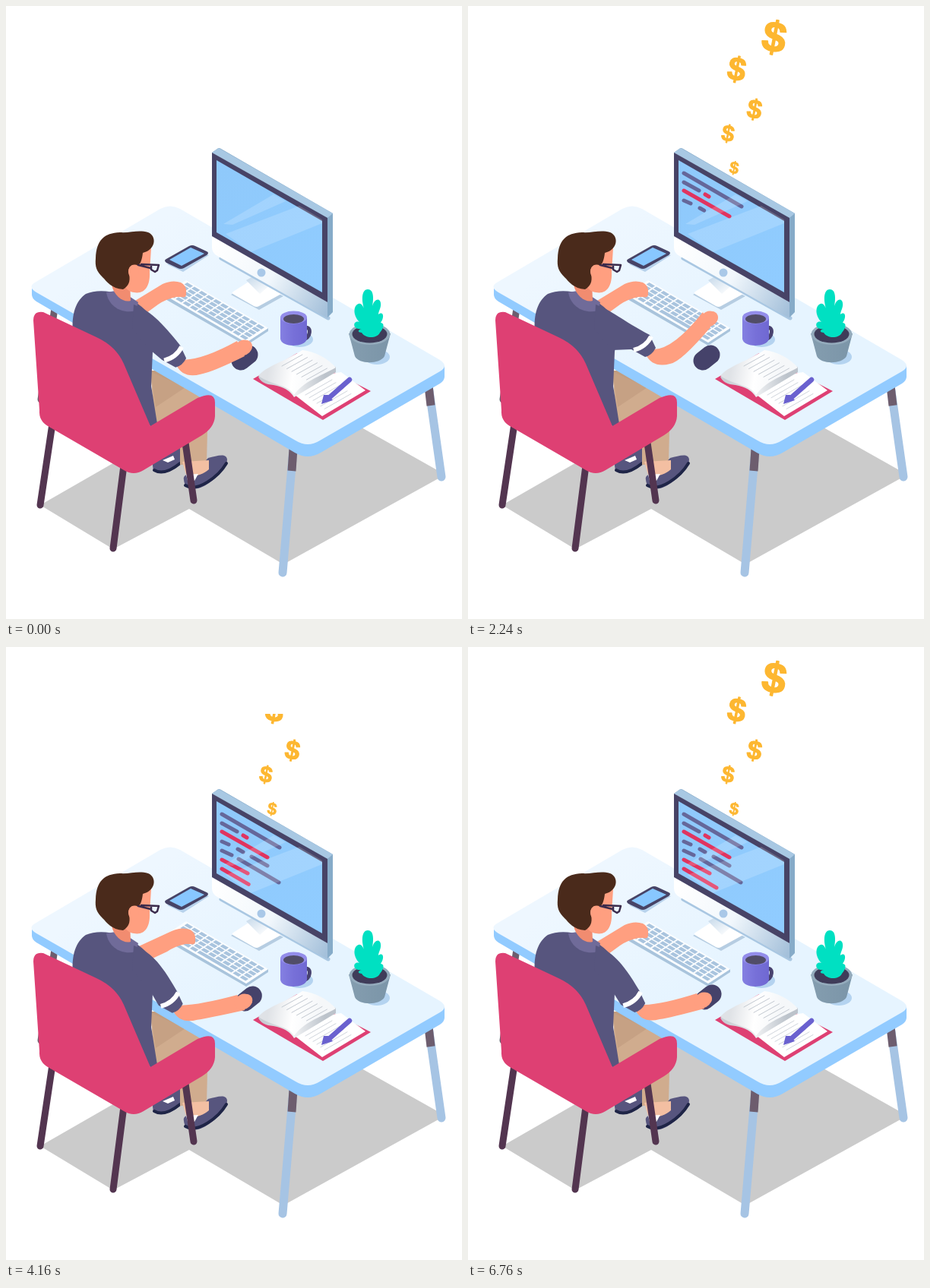
An HTML page with a canvas that plays this animation: 600x807 px, repeating every 6.8 s.

```html
<!DOCTYPE html>
<html lang="en">
<head>
<meta charset="utf-8">
<title>Working at the desk</title>
<style>
html, body { margin: 0; width: 100%; height: 100%; overflow: hidden; background: #fff; }
canvas { display: block; width: 600px; height: 807px; }
</style>
</head>
<body>
<canvas id="stage" width="600" height="807"></canvas>
<script>
const ctx = document.getElementById('stage').getContext('2d');
const SKIN = '#ff9f80', SHIRT = '#57557e', DARK = '#45426a', PINK = '#de4073', STEEL = '#a6c4e4';

const clamp = (v, a = 0, b = 1) => Math.min(b, Math.max(a, v));
const mix = (a, b, k) => a + (b - a) * k;
const ramp = (v, a, b) => { const k = clamp((v - a) / (b - a)); return k * k * (3 - 2 * k); };

function shape(d, fill) {
  ctx.fillStyle = fill;
  ctx.fill(new Path2D(d));
}
function line(d, width, color, cap = 'round') {
  ctx.strokeStyle = color;
  ctx.lineWidth = width;
  ctx.lineCap = cap;
  ctx.lineJoin = 'round';
  ctx.stroke(new Path2D(d));
}
function oval(x, y, rx, ry, fill, turn = 0) {
  ctx.fillStyle = fill;
  ctx.beginPath();
  ctx.ellipse(x, y, rx, ry, turn, 0, Math.PI * 2);
  ctx.fill();
}
function fade(x0, y0, x1, y1, ...colors) {
  const g = ctx.createLinearGradient(x0, y0, x1, y1);
  colors.forEach((c, i) => g.addColorStop(i / (colors.length - 1), c));
  return g;
}

function drawFloor() {
  shape('M45 657L280 522L420 528L578 617L365 735L241 662L141 715Z', '#cbcbcb');
  line('M64 398L46 518', 9, '#6d5d6e');
}

function drawLegs() {
  shape('M190 480L240 480L232 584L222 586L196 545Z', '#c19d80');
  shape('M193 605C192 597 202 592 212 588L222 580H234V598C224 612 206 618 194 612Z', SHIRT);
  line('M195 611Q208 619 229 602', 4, '#1f2547');
  shape('M206 598L220 592L222 597L213 601Z', '#fff');
  shape('M190 482L266 516L264 602L229 604L229 548L205 552L196 545Z', '#d0ac8e');
  shape('M190 482L236 502L197 528Z', '#c6a184');
  shape('M234 624C232 617 240 616 250 612L266 595C278 592 290 588 291 597C291 608 272 628 256 634C245 638 235 635 234 624Z', SHIRT);
  line('M236 631C252 641 280 619 290 602', 4, '#1f2547');
  shape('M232 600L267 598L267 610C258 618 244 621 237 617Z', '#f3bfa2');
  shape('M237 617L253 616L248 625L239 625Z', '#fff');
}

function drawTable() {
  for (const [a, b, c] of [['378 583', '376 612', '364 746'], ['556 500', '559 526', '573 620']]) {
    line(`M${a}L${c}`, 11, STEEL);
    line(`M${a}L${b}`, 11, '#6d5d6e', 'butt');
  }
  shape('M34 370V380Q34 385 40 389L380 588Q397 598 414 588L571 497Q577 493 577 488V474Z', '#92cbff');
  shape('M38 364L203 267Q216 260 229 267L571 466Q583 474 571 481L413 572Q397 582 381 572L40 377Q28 370 38 364Z',
    fade(190, 290, 300, 450, '#eef7ff', '#e6f4ff'));
}

function drawMonitor() {
  shape('M296 380L326 364L365 382L333 400Z', '#b6cde2');
  shape('M299 376L327 358L364 378L333 395Q330 397 326 395L300 380Q296 378 299 376Z', '#fff');
  shape('M316 361L338 349L355 361L334 379Z', fade(325, 350, 345, 378, '#c6d9ea', '#fff'));
  line('M283 332L424 411', 5, '#a9c7e2');
  shape('M271 303L423 390V411L278 329Q271 325 271 318Z', fade(275, 315, 423, 400, '#fff', '#f1f7fc', '#a4c0da'));
  shape('M271 193L278 188Q280 186 283 188L430 273V403L423 410V280Z', '#86abc9');
  shape('M271 193L280 187L430 273L423 279Z', '#a8c8e3');
  shape('M271 193L423 279V390L271 303Z', '#474366');
  shape('M277 203L416 283V377L277 298Z', fade(280, 210, 410, 370, '#8fc9fb', '#90ccff'));
  oval(336, 351, 5.5, 5.5, '#a9c8e8');
}

// x0, y0, x1, y1, color, first and last frame of the typing
const GREY = '#65679a', RED = '#e0345f';
const CODE = [
  [284, 220, 360, 264, GREY, 15, 25],
  [284, 232, 304, 243, GREY, 25, 29], [312, 248, 317, 251, RED, 29, 32],
  [284, 243, 344, 277, RED, 34, 46],
  [284, 256, 293, 260, GREY, 47, 50], [305, 266, 312, 270, GREY, 52, 57], [323, 276, 344, 288, GREY, 58, 63],
  [284, 268, 297, 274, GREY, 64, 68], [306, 279, 359, 310, GREY, 68, 78],
  [284, 280, 318, 298, RED, 84, 94],
  [284, 292, 327, 317, RED, 95, 106]
];
function drawScreen(frame) {
  for (const [x0, y0, x1, y1, color, from, to] of CODE) {
    if (frame <= from) continue;
    const k = clamp((frame - from) / (to - from));
    line(`M${x0} ${y0}L${mix(x0, x1, k)} ${mix(y0, y1, k)}`, 5, color);
  }
  const glare = 'rgba(255,255,255,.17)';
  shape('M286 287L352 248L368 257L298 288Z', glare);
  shape('M289 300L386 263L416 281V286L322 324Z', glare);
}

function drawPhone() {
  shape('M212 340L248 321L267 328L233 350Z', '#b7d2ec');
  shape('M211 333L241 316Q245 314 249 316L264 323Q268 325 264 328L234 345Q230 347 226 345L211 338Q207 335 211 333Z', '#474366');
  shape('M215 334L243 318L261 326L231 342Z', '#88c7ff');
}

function drawKeyboard() {
  const at = (u, v) => `${237 + 108 * u - 29 * v} ${361 + 63 * u + 19 * v}`;
  shape('M208 380L316 443L345 424V428L316 447L208 385Z', '#a9c4dc');
  shape(`M${at(0, 0)}L${at(1, 0)}L${at(1, 1)}L${at(0, 1)}Z`, '#fbfdff');
  for (let row = 0; row < 5; row++) {
    const v = .06 + row * .18;
    for (let col = 0; col < 11; col++) {
      const wide = row === 4 && col > 3 && col < 8;
      const u = .03 + col * .087, end = u + (wide ? .09 : .07);
      shape(`M${at(u, v)}L${at(end, v)}L${at(end, v + .135)}L${at(u, v + .135)}Z`, '#a9c4de');
    }
  }
}

function drawCup() {
  oval(386, 439, 18, 10, '#b4d3f0');
  line('M392 424C403 419 401 439 391 438', 5, '#48426f');
  shape('M361 410V438C362 450 394 450 396 438V410Z', fade(361, 0, 396, 0, '#8580e2', '#7770d8', '#6f68d2'));
  oval(378.5, 410, 17.5, 8.5, '#938dea');
  oval(378.5, 412, 13.5, 6, '#514d68');
}

function drawPlant() {
  oval(488, 462, 17, 10, '#b4d3f0');
  shape('M451 431L459 461C464 472 492 472 498 461L506 431Z', fade(451, 0, 506, 0, '#849daf', '#7b95a8'));
  oval(478.5, 432, 27, 14, '#94abbc');
  oval(478.5, 432, 23, 11.5, '#3f3c59');
  shape('M468 425C455 427 456 413 465 416C456 407 457 394 464 392C468 391 470 396 471 398C467 384 469 373 476 373C484 373 484 385 482 395C485 385 492 384 493 391C494 397 490 402 490 406C497 401 498 410 493 417C500 418 495 427 492 430C488 438 473 438 468 430C464 430 461 427 468 425Z', '#00e0c2');
}

function drawBook() {
  shape('M325 491L383 457L480 507L417 545Z', PINK);
  shape('M380 512L428 484L441 482L473 506L416 540Z', '#fff');
  shape('M332 488Q336 498 352 499Q371 502 379 515L434 482V475L390 470Z', fade(340, 495, 420, 490, '#c8cdd3', '#eef0f2', '#bcc3cb'));
  shape('M332 487C342 474 367 468 390 453C407 455 424 464 434 476C412 488 392 494 379 512C371 498 352 500 332 487Z',
    fade(345, 480, 410, 490, '#dfe2e6', '#fff', '#f5f7f9'));
  for (let i = 0; i < 6; i++) {
    const x = 363 + i * 6.5, y = 474 + i * 3.6;
    line(`M${x} ${y}L${x + 27} ${y - 15}`, 1, '#c3c9d1');
    const px = 394 + i * 5, py = 512 + i * 3.7;
    line(`M${px} ${py}L${px + 35} ${py - 20}`, 1, '#d0d5dc');
  }
  line('M426 515L452 492', 6.5, '#6a61cf');
  shape('M415 524L418 512L424 512L430 519Z', '#6a61cf');
}

function drawMouse({ x, y }) {
  ctx.save();
  ctx.translate(x, y);
  line('M-5 4L5 -4', 25, DARK);
  ctx.restore();
}

function drawLeftArm(reach) {
  ctx.save();
  ctx.translate(12 * reach, 8 * reach);
  const x = 160 - 6 * reach, y = 394 - 4 * reach;
  shape(`M${x} ${y}L206 366Q219 360 230 364Q238 368 237 377Q238 385 231 383L224 383Q210 386 200 393L${x + 14} ${y + 18}Z`, SKIN);
  ctx.restore();
}

function drawBody() {
  shape('M88 430C86 405 92 388 105 379C122 371 153 376 169 389C183 398 192 408 198 424L193 455L191 500L199 550L192 556L130 470L88 445Z', SHIRT);
  shape('M132 377L150 374L174 390L171 401C153 406 135 396 132 377Z', '#706b99');
  shape('M139 367L163 360L164 388C155 391 142 382 139 367Z', '#f18c70');
}

function drawHead() {
  shape('M164 336L178 322L191 319L189 350C190 368 183 380 168 377C154 375 148 358 164 336Z', SKIN);
  shape('M118 332C119 308 129 299 150 298C164 299 174 294 187 298C199 303 197 321 180 325C179 334 177 339 174 342C167 338 159 343 162 353C164 363 161 369 154 373C139 372 133 363 127 357C119 349 117 343 118 332Z', '#4a2a1b');
  oval(168, 350, 7, 9, SKIN);
  line('M174 341L190 345M178 340L201 341L199 348L196 350L191 347V342', 2.5, '#3b2b4b');
}

function drawRightArm({ x, y }) {
  const k = clamp((y - 412) / 50, -.1, 1.1);
  const cx = mix(228, 215, k), cy = mix(445, 463, k);
  shape(`M${cx + 6} ${cy + 14}Q${cx + 15} ${cy + 32} ${cx + 38} ${cy + 26}Q${cx + 52} ${cy + 24} ${x + 2} ${y + 11}L${x - 8} ${y - 9}Q${cx + 43} ${cy + 6} ${cx + 17} ${cy + 7}Z`, SKIN);
  oval(x, y, 12, 10, SKIN, -.45);
  oval(x + 4, y - 2, 8, 8, SKIN);
  shape(`M168 393C188 400 203 414 ${cx + 11} ${cy - 12}L${cx + 19} ${cy + 5}Q${cx + 14} ${cy + 15} ${cx + 5} ${cy + 17}L${cx - 13} ${cy + 7}L190 453L166 425Z`, SHIRT);
  line(`M${cx - 10} ${cy + 8}Q${cx + 6} ${cy + 4} ${cx + 13} ${cy - 10}`, 6, '#fff', 'butt');
}

function drawChair() {
  for (const leg of ['M61 550L45 657', 'M155 605L141 714', 'M236 575L247 651']) line(leg, 9, '#533550');
  shape('M36 414Q36 401 49 403L119 436Q145 448 155 471L190 553L252 516Q275 506 275 522V540Q274 555 258 565L181 611Q168 619 155 611L55 553Q43 546 44 532Z', PINK);
}

const COINS = [[403, 42, 56], [353.5, 84, 43], [377, 136.5, 35], [342, 168.5, 30], [350, 213.5, 22]];
function drawCoins(top) {
  ctx.save();
  ctx.beginPath();
  ctx.rect(300, top, 160, 240);
  ctx.clip();
  ctx.fillStyle = ctx.strokeStyle = '#fdb731';
  ctx.textAlign = 'center';
  for (const [x, y, size] of COINS) {
    ctx.save();
    ctx.translate(x, y);
    ctx.rotate(.19);
    ctx.font = `bold ${size}px "Liberation Sans", Arial, sans-serif`;
    ctx.lineWidth = size * .03;
    ctx.fillText('$', 0, size * .32);
    ctx.strokeText('$', 0, size * .32);
    ctx.restore();
  }
  ctx.restore();
}

// The coins are wiped in and out; the top edge of the wipe speeds up slightly downwards.
function wipeEdge(frame) {
  const u = Math.abs(frame % 22 - 11);
  return -14 + 19.4 * u + .2 * u * u;
}

function leftReach(frame) {
  if (frame > 20 && frame < 56) return Math.sin(Math.PI * (frame - 32) / 12) ** 2;
  if (frame > 79 && frame < 119) return Math.sin(Math.PI * (frame - 79) / 10) ** 2;
  return 0;
}

function rightPose(frame) {
  const wave = (from, period) => Math.cos(2 * Math.PI * (frame - from) / period);
  const back = ramp(frame, 58, 69), moved = ramp(frame, 67, 74);
  const mouse = {
    x: mix(314, 318 + 2 * wave(90, 104), moved),
    y: mix(463, 460 - 3 * wave(79, 50), moved)
  };
  const typing = ramp(frame, 1, 13) * (1 - back);
  const rest = { x: mix(312, mouse.x - 7, back), y: mix(450, mouse.y + 4, back) };
  const hand = { x: mix(rest.x, 317, typing), y: mix(rest.y, 419 + 7 * wave(32, 16), typing) };
  return { mouse, hand };
}

function draw(frame) {
  const tail = clamp(Math.min(frame - 151, 170 - frame), 0, 9);
  const now = Math.min(frame, 143) + tail;
  const { mouse, hand } = rightPose(now);
  ctx.fillStyle = '#fff';
  ctx.fillRect(0, 0, 600, 807);
  drawFloor();
  drawLegs();
  drawTable();
  drawMonitor();
  drawScreen(now);
  drawPhone();
  drawKeyboard();
  drawCup();
  drawPlant();
  drawBook();
  drawMouse(mouse);
  drawLeftArm(leftReach(now));
  drawBody();
  drawHead();
  drawRightArm(hand);
  drawChair();
  drawCoins(wipeEdge(now));
}

const start = performance.now();
function tick() {
  draw(Math.floor((performance.now() - start) % 6800 / 40));
  requestAnimationFrame(tick);
}
tick();
</script>
</body>
</html>
```
